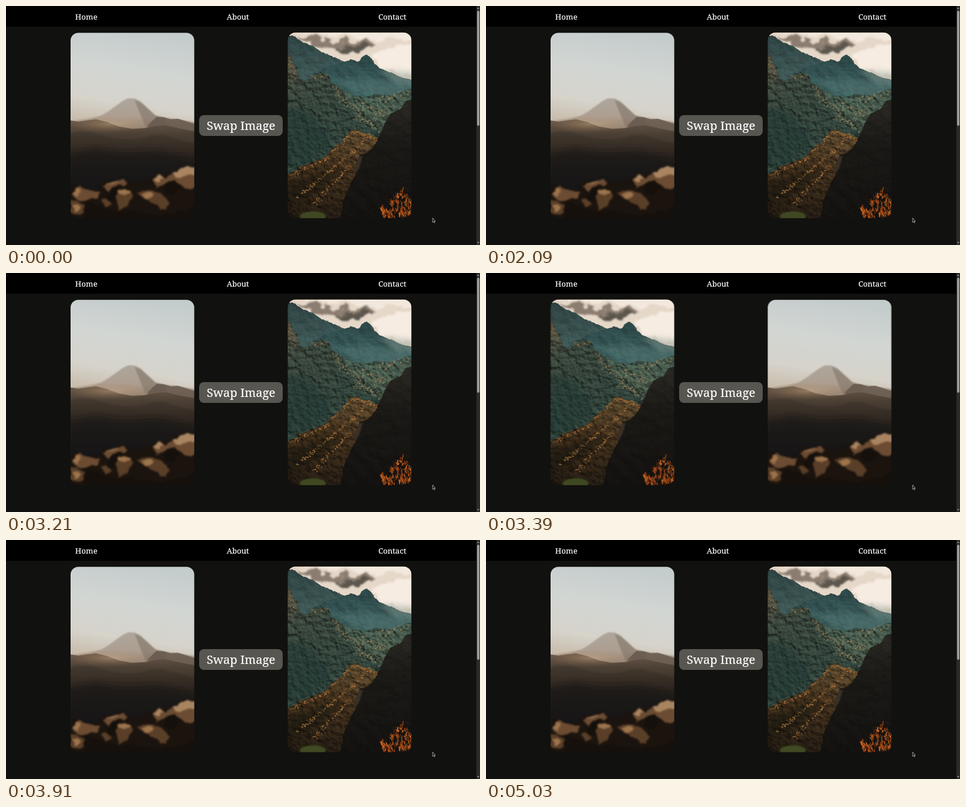
Animation of 800 by 403 pixels, one loop 5.27 s. Source, as an HTML page:

```html
<!DOCTYPE html>
<html lang="en">
<head>
<meta charset="utf-8">
<title>Swap Image</title>
<style>
  html, body { margin: 0; width: 100%; height: 100%; overflow: hidden; background: #11110f; }
  svg { display: block; width: 800px; height: 403px; }
  text { font-family: "Roboto Slab", "Noto Serif", serif; text-anchor: middle; fill: #fff; stroke: #fff; stroke-width: .2px; }
  .nav text { font-size: 13.1px; }
  .button text { font-size: 20px; }
</style>
</head>
<body>
<svg viewBox="0 0 800 403">
  <defs>
    <clipPath id="cardA"><rect x="109" y="45.2" width="208.7" height="312.4" rx="13"/></clipPath>
    <clipPath id="cardB"><rect x="475.5" y="44.8" width="208.7" height="313" rx="13"/></clipPath>

    <linearGradient id="sky" x1=".6" y1="0" x2=".4" y2="1">
      <stop offset="0" stop-color="#c4cccc"/><stop offset=".4" stop-color="#d2d6d3"/>
      <stop offset=".75" stop-color="#d6d3cb"/><stop offset="1" stop-color="#c8bbaa"/>
    </linearGradient>
    <linearGradient id="peak" x1="0" y1="0" x2="0" y2="1">
      <stop offset="0" stop-color="#aea69c"/><stop offset=".45" stop-color="#ad9f91"/><stop offset="1" stop-color="#7f6c5a"/>
    </linearGradient>
    <linearGradient id="hill" x1="0" y1="0" x2="0" y2="1">
      <stop offset="0" stop-color="#6a594a"/><stop offset=".15" stop-color="#4b3f34"/><stop offset=".6" stop-color="#1e1a16"/>
    </linearGradient>
    <linearGradient id="slope" x1="0" y1="0" x2="0" y2="1">
      <stop offset="0" stop-color="#443a30"/><stop offset=".3" stop-color="#2a231d"/><stop offset=".6" stop-color="#191512"/>
    </linearGradient>
    <radialGradient id="haze">
      <stop offset="0" stop-color="#d9b48c" stop-opacity=".42"/><stop offset="1" stop-color="#a57950" stop-opacity="0"/>
    </radialGradient>

    <linearGradient id="far" x1="0" y1="0" x2="0" y2="1">
      <stop offset="0" stop-color="#2c4040"/><stop offset="1" stop-color="#45625f"/>
    </linearGradient>
    <linearGradient id="mid" x1="0" y1="0" x2="0" y2="1">
      <stop offset="0" stop-color="#2b4546"/><stop offset=".6" stop-color="#3c5f5d"/><stop offset="1" stop-color="#304f4b"/>
    </linearGradient>
    <linearGradient id="wood" x1="0" y1="0" x2="0" y2="1">
      <stop offset="0" stop-color="#3d5550"/><stop offset=".4" stop-color="#465a4f"/><stop offset="1" stop-color="#344139"/>
    </linearGradient>
    <linearGradient id="crag" x1="0" y1="0" x2=".5" y2="1">
      <stop offset="0" stop-color="#5b5446"/><stop offset=".3" stop-color="#38463f"/><stop offset="1" stop-color="#2c423e"/>
    </linearGradient>
    <linearGradient id="ridge" x1=".6" y1="0" x2=".4" y2="1">
      <stop offset="0" stop-color="#57472f"/><stop offset=".4" stop-color="#3f301e"/><stop offset="1" stop-color="#201a13"/>
    </linearGradient>
    <linearGradient id="dark" x1="0" y1="0" x2="0" y2="1">
      <stop offset="0" stop-color="#2a2923"/><stop offset=".35" stop-color="#1b1916"/><stop offset="1" stop-color="#13110f"/>
    </linearGradient>

    <filter id="soft"><feGaussianBlur stdDeviation="1.1"/></filter>
    <filter id="bokeh" color-interpolation-filters="sRGB">
      <feTurbulence type="fractalNoise" baseFrequency=".06" numOctaves="2" seed="5" result="n"/>
      <feDisplacementMap in="SourceGraphic" in2="n" scale="12" xChannelSelector="R" yChannelSelector="G"/>
      <feGaussianBlur stdDeviation="1.7"/>
    </filter>
    <filter id="softer" x="-20%" y="-40%" width="140%" height="180%"><feGaussianBlur stdDeviation="4"/></filter>
    <filter id="cloud" x="-20%" y="-20%" width="140%" height="140%">
      <feTurbulence type="fractalNoise" baseFrequency=".05" numOctaves="4" seed="4" result="n"/>
      <feDisplacementMap in="SourceGraphic" in2="n" scale="24" xChannelSelector="R" yChannelSelector="G"/>
      <feGaussianBlur stdDeviation="1.8"/>
    </filter>
    <filter id="rock" color-interpolation-filters="sRGB">
      <feTurbulence type="fractalNoise" baseFrequency=".1" numOctaves="4" seed="9" result="n"/>
      <feDisplacementMap in="SourceGraphic" in2="n" scale="7" xChannelSelector="R" yChannelSelector="G" result="s"/>
      <feDiffuseLighting in="n" surfaceScale="2.6" lighting-color="#fff6ea" result="l">
        <feDistantLight azimuth="300" elevation="50"/>
      </feDiffuseLighting>
      <feComposite in="s" in2="l" operator="arithmetic" k1="1.35"/>
    </filter>
    <filter id="faint" color-interpolation-filters="sRGB">
      <feTurbulence type="fractalNoise" baseFrequency=".06" numOctaves="4" seed="3" result="n"/>
      <feDisplacementMap in="SourceGraphic" in2="n" scale="5" xChannelSelector="R" yChannelSelector="G" result="s"/>
      <feDiffuseLighting in="n" surfaceScale="1.3" lighting-color="#fff" result="l">
        <feDistantLight azimuth="300" elevation="52"/>
      </feDiffuseLighting>
      <feComposite in="s" in2="l" operator="arithmetic" k1="1.28"/>
    </filter>
  </defs>

  <rect width="800" height="403" fill="#11110f"/>
  <rect width="794" height="35" fill="#000"/>

  <g class="nav">
    <text x="135.5" y="22.5">Home</text>
    <text x="391.3" y="22.5">About</text>
    <text x="652" y="22.5">Contact</text>
  </g>

  <g id="dawn"><g clip-path="url(#cardA)">
    <rect x="109" y="45" width="209" height="160" fill="url(#sky)"/>
    <path filter="url(#soft)" fill="url(#peak)" d="M100 196L140 190 160 185 172 178 186 168 197 160 206 155.5 217 156 226 160 239 172 252 184 268 188 290 191 325 197V225H100Z"/>
    <path fill="#75685b" opacity=".45" filter="url(#soft)" d="M217 158L228 163 240 174 252 185 270 190V205H236L228 186Z"/>
    <path fill="#64564a" opacity=".8" d="M240 200L254 187 266 187.5 278 191 290 190 303 194 318 199V225H236Z"/>
    <path fill="url(#hill)" d="M109 193L122 195 136 193 152 191 172 196 190 203 212 207 234 206 254 202 270 201 290 206 318 211V358H109Z"/>
    <ellipse cx="176" cy="199" rx="75" ry="15" fill="url(#haze)"/>
    <path fill="url(#slope)" filter="url(#soft)" d="M105 215L124 212 145 213 166 219 190 224 220 225 245 219 262 217 285 224 325 233V362H105Z"/>
    <path fill="#191512" opacity=".6" filter="url(#softer)" d="M105 250L150 240 200 247 260 244 325 260V362H105Z"/>
    <g filter="url(#bokeh)">
      <path fill="#1b130d" d="M100 312L118 304 134 309 154 309 166 297 190 291 207 296 220 302 236 293 250 288 268 288 288 275 330 270V370H100Z"/>
      <path fill="#6b4c32" d="M246 293L258 286 270 291 287 278 304 272 330 272V300L304 308 290 296 270 300 256 306ZM109 318L122 306 140 312 160 312 150 324 122 326ZM163 305L180 294 196 293 206 300 188 304 172 314Z"/>
      <path fill="#5a3f28" d="M109 330L122 328 136 338 130 350 109 352ZM185 318L203 309 214 318 204 334 190 342ZM220 318L242 310 262 314 276 330 272 346 256 340 240 324ZM160 326L172 322 180 334 166 338Z"/>
      <path fill="#a98460" d="M281 281L292 275 306 272 326 273V285L300 287 288 290ZM248 293L258 287 267 291 256 297Z"/>
      <path fill="#9c744c" d="M112 316L121 308 128 313 120 321ZM188 313L201 306 210 312 200 320ZM166 302L178 295 190 294 178 301ZM112 336L120 333 126 341 116 347ZM228 318L242 313 250 319 240 324Z"/>
      <path fill="#15100c" d="M270 300L288 294 296 306 284 318 266 314ZM172 312L190 304 192 316 180 330 168 322ZM136 330L160 338 186 346 215 343 240 352 282 350 330 335V370H130Z"/>
    </g>
  </g></g>

  <g id="valley"><g clip-path="url(#cardB)">
    <rect x="475" y="44" width="210" height="315" fill="#e6d8c9"/>
    <g filter="url(#cloud)">
      <path fill="#8b7d70" d="M484 48L520 54 560 62 588 60 608 56 620 66 604 76 575 74 540 70 505 60Z"/>
      <path fill="#5c564e" d="M556 68L584 66 602 63 612 70 596 79 572 78Z"/>
      <path fill="#f3e8dd" d="M495 36H700V62L650 54 618 58 590 52 545 54Z"/>
      <path fill="#f6ece2" d="M616 82L640 72 664 66 700 68V112L660 114 630 102Z"/>
    </g>
    <path fill="url(#far)" filter="url(#faint)" d="M465 47L484 50 502 62 519 68 534 79 554 86 570 94 582 91 593 94V145H465Z"/>
    <path fill="url(#mid)" filter="url(#faint)" d="M500 127L523 116 541 104 560 98 577 93 592 95 601 86 609 82 619 92 630 105 648 112 666 120 694 128V185H500Z"/>
    <path fill="#93a39a" opacity=".4" filter="url(#softer)" d="M628 108L650 108 694 112V136L660 132Z"/>
    <path fill="#6c8c87" opacity=".25" filter="url(#softer)" d="M557 128L600 120 665 132 684 135V150L620 157Z"/>
    <path fill="url(#wood)" filter="url(#rock)" d="M500 145L555 133 580 148 605 154 627 148 650 151 670 143 694 137V255H480Z"/>
    <path fill="url(#crag)" filter="url(#rock)" d="M465 77L480 83 486 98 494 111 495 124 508 126 517 116 532 112 546 119 552 132 566 143 577 160 594 176 620 193 638 213 600 255 540 280 465 296Z"/>
    <path fill="#1b3431" opacity=".45" filter="url(#softer)" d="M470 170L505 174 536 205 550 232 500 270 470 270Z"/>
    <g id="trees"/>
    <path fill="url(#ridge)" filter="url(#rock)" d="M465 292L490 275 513 264 536 257 554 239 572 228 580 211 590 208 607 218 629 222 625 265 590 365H465Z"/>
    <path fill="#19150f" opacity=".55" filter="url(#softer)" d="M475 299L510 290 545 274 565 278 532 306 502 326 475 334Z"/>
    <g id="crest"/>
    <path fill="url(#dark)" filter="url(#faint)" d="M694 156L676 161 666 175 650 181 640 195 633 214 624 232 609 247 597 251 589 269 590 284 577 309 568 332 564 368H694Z"/>
    <path fill="#6f5a45" opacity=".4" filter="url(#soft)" d="M596 253L602 253 596 273 587 287 590 269Z"/>
    <ellipse cx="518" cy="355" rx="22" ry="9" fill="#3f4a20" filter="url(#soft)"/>
    <g id="grass"/>
  </g></g>

  <g class="button">
    <rect x="326" y="184" width="141" height="35" rx="8" fill="#575651"/>
    <text x="396.6" y="209">Swap Image</text>
  </g>

  <g>
    <rect x="794" width="6" height="403" fill="#2b2b2a"/>
    <rect x="795" y="8" width="4" height="194" rx="2" fill="#9d9b97"/>
    <path fill="#9d9b97" d="M795.2 5L797 2.5 798.8 5ZM795.2 398L797 400.5 798.8 398Z"/>
  </g>
  <path d="M720 357.5V364.8L721.7 363.3 722.8 365.6 723.8 365.1 722.8 362.9H724.8Z" fill="#11110f" stroke="#d8d8d5" stroke-width=".7"/>
</svg>
<script>
  const LOOP = 5270, SHIFT = 366.5;
  const swaps = [2880, 3210, 3390, 3580, 3730, 3910, 4060, 4210];
  const byId = id => document.getElementById(id);

  let seed = 7;
  const rand = () => (seed = seed * 16807 % 2147483647) / 2147483647;
  const jitter = size => (rand() + rand() - 1) * size;

  // Short strokes strewn around a line from (x1, y1) to (x2, y2).
  function strew(id, [x1, y1, x2, y2], { count, spread, reach, rise = 0, colors }) {
    let marks = '';
    for (let i = 0; i < count; i++) {
      const k = rand();
      const x = x1 + (x2 - x1) * k + jitter(spread), y = y1 + (y2 - y1) * k + jitter(spread);
      const dx = jitter(reach), dy = jitter(reach * .6) - rise;
      const color = colors[Math.floor(rand() * colors.length)];
      marks += `<path d="M${x} ${y}l${dx} ${dy}" stroke="${color}" stroke-width="${.7 + rand() * .9}" stroke-linecap="round"/>`;
    }
    byId(id).insertAdjacentHTML('beforeend', marks);
  }

  const leaves = { count: 70, spread: 9, reach: 3, colors: ['#8a7a58', '#a18a62', '#6d6a4e', '#5d6550'] };
  [[560, 150, 600, 185], [590, 165, 640, 180], [630, 160, 684, 145], [590, 185, 636, 210]]
    .forEach(line => strew('trees', line, leaves));
  const stones = { count: 30, spread: 5, reach: 4, colors: ['#7d6648', '#8f7350', '#55523f'] };
  [[478, 88, 490, 122], [512, 120, 545, 118], [548, 130, 580, 165]]
    .forEach(line => strew('trees', line, stones));

  const glow = { count: 45, spread: 4, reach: 5, colors: ['#8a5c2c', '#a36c35', '#6a4824', '#b27c43'] };
  [[480, 286, 545, 255], [545, 252, 585, 214], [590, 212, 628, 224], [605, 228, 545, 280], [545, 280, 490, 325], [580, 270, 520, 335]]
    .forEach(line => strew('crest', line, glow));

  const brush = { count: 32, spread: 4, reach: 5, rise: 4, colors: ['#8a3d13', '#b8571b', '#cc6a25', '#6b2d10'] };
  [[634, 340, 640, 358], [642, 346, 648, 358], [651, 330, 654, 358], [660, 314, 662, 356], [668, 306, 668, 356], [677, 316, 672, 356], [683, 325, 680, 356]]
    .forEach(line => strew('grass', line, brush));

  function hop(id, distance) {
    const frames = [0, ...swaps, LOOP].map((t, i) => ({
      offset: t / LOOP,
      transform: `translateX(${t < LOOP && i % 2 ? distance : 0}px)`,
      easing: 'steps(1, end)'
    }));
    byId(id).animate(frames, { duration: LOOP, iterations: Infinity }).startTime = 0;
  }
  hop('dawn', SHIFT);
  hop('valley', -SHIFT);
</script>
</body>
</html>
```
